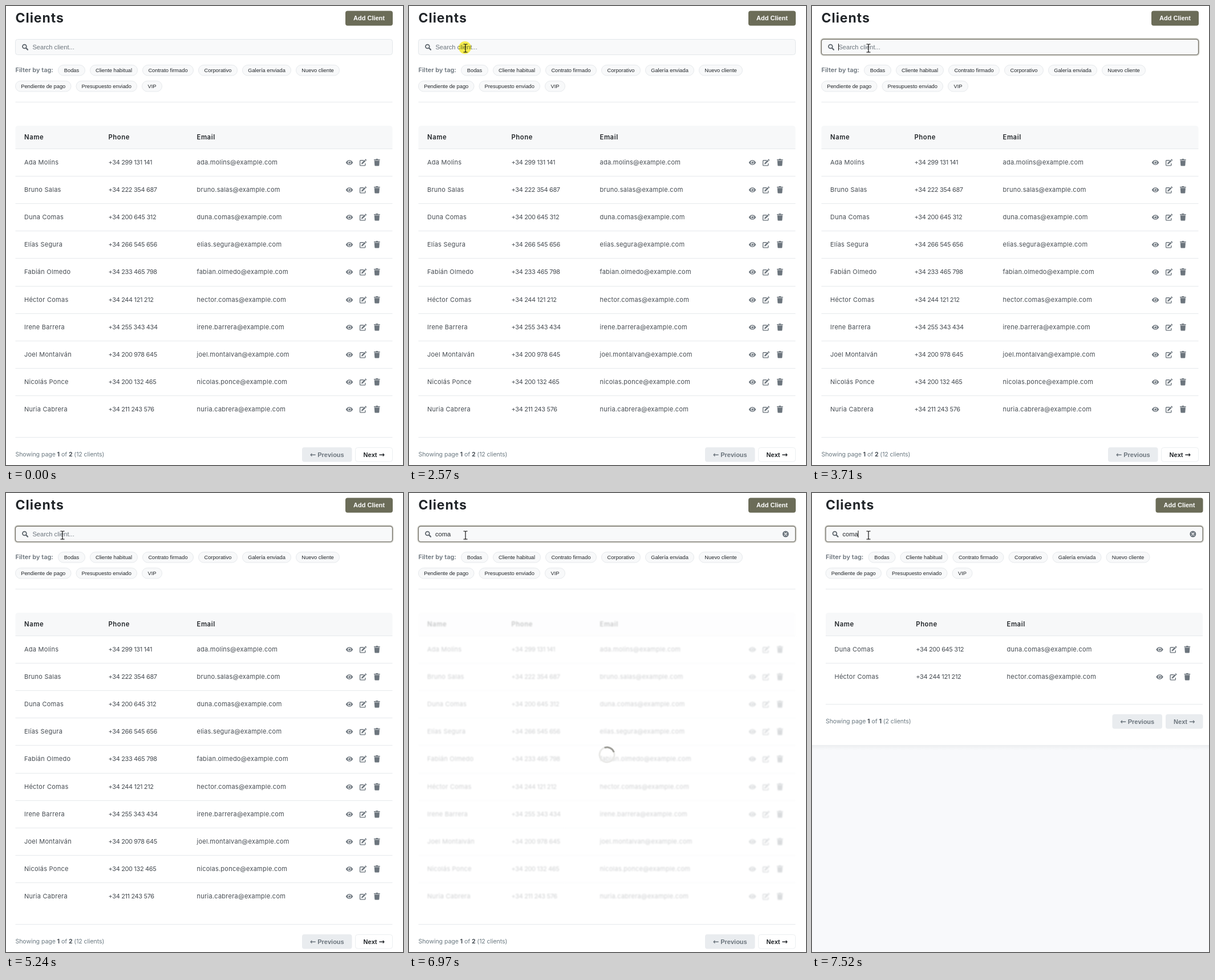
Animation of 696x805 px, one loop 8000 ms. Source, as an HTML page:

```html
<!DOCTYPE html>
<html lang="en">
<head>
<meta charset="utf-8">
<title>Clients</title>
<style>
html, body { margin: 0; width: 100%; height: 100%; overflow: hidden; background: #fff; }
svg { display: block; width: 696px; height: 805px; }
text { font-family: Inter, "Open Sans", sans-serif; font-size: 11px; white-space: pre; }
.ui { font-family: "Liberation Sans", Arial, sans-serif; }
.title { font-size: 23px; font-weight: 700; letter-spacing: .95px; fill: #212529; }
.filter { font-weight: 600; fill: #6c757d; }
.field { font-size: 11.1px; }
.tag { font-size: 9.3px; fill: #212529; text-anchor: middle; }
.btn { font-weight: 700; text-anchor: middle; }
.sign { font-family: "DejaVu Sans", sans-serif; font-size: 12.5px; }
.head { font-size: 11.3px; font-weight: 600; letter-spacing: .55px; fill: #212529; }
.cell { letter-spacing: .25px; fill: #464c52; }
.phone { letter-spacing: -.37px; }
.foot { font-size: 10.6px; letter-spacing: -.1px; fill: #6c7a82; }
.foot tspan { font-weight: 700; fill: #495057; }
</style>
</head>
<body>
<svg id="stage" viewBox="0 0 696 805">
  <defs>
    <g id="eye">
      <path d="M-6.3 0C-4.6-2.9-2.4-4.3 0-4.3S4.6-2.9 6.3 0C4.6 2.9 2.4 4.3 0 4.3S-4.6 2.9-6.3 0Z" fill="#6c757d"/>
      <circle r="3" fill="#fff"/><circle r="2.1" fill="#6c757d"/><circle cx="-.8" cy="-.8" r=".8" fill="#fff"/>
    </g>
    <g id="edit" fill="none" stroke="#6c757d">
      <path d="M1-3.8H-4.4Q-5.4-3.8-5.4-2.8V4.4Q-5.4 5.4-4.4 5.4H2.8Q3.8 5.4 3.8 4.4V1.6" stroke-width="1.4"/>
      <path d="M-1.6 1.6 3.6-3.6" stroke-width="2.7"/>
      <path d="M4.1-4.1 5.3-5.3" stroke-width="3"/>
      <path d="M-3 3-2.6.5-.5 2.6Z" fill="#6c757d" stroke="none"/>
    </g>
    <path id="trash" fill="#6c757d" d="M-5.3-5.3H-2.3L-1.7-6.2H1.7L2.3-5.3H5.3V-3.8H-5.3ZM-4.6-3H4.6L4 5.1Q3.9 6.2 2.9 6.2H-2.9Q-3.9 6.2-4 5.1Z"/>
    <linearGradient id="shade" x2="0" y2="1">
      <stop offset="0" stop-color="#eceef0"/><stop offset="1" stop-color="#f8f9fb"/>
    </linearGradient>
  </defs>
  <g id="page"></g>
</svg>
<script>
const LOOP = 8000, STEP = 200 / 3;
const FOCUS = 2640, LOAD = 6970, RESULT = 7180, DONE = 7320;

const people = [
  ["Ada Molins", "299 131 141"], ["Bruno Salas", "222 354 687"],
  ["Duna Comas", "200 645 312"], ["Elías Segura", "266 545 656"],
  ["Fabián Olmedo", "233 465 798"], ["Héctor Comas", "244 121 212"],
  ["Irene Barrera", "255 343 434"], ["Joel Montalván", "200 978 645"],
  ["Nicolás Ponce", "200 132 465"], ["Nuria Cabrera", "211 243 576"]
];
const tags = [
  ["Bodas", 91.5, 138.5, 0], ["Cliente habitual", 147.5, 230.5, 0],
  ["Contrato firmado", 239.5, 328.5, 0], ["Corporativo", 337.5, 405.5, 0],
  ["Galería enviada", 414.5, 499.5, 0], ["Nuevo cliente", 508.5, 584.5, 0],
  ["Pendiente de pago", 16.5, 114, 28], ["Presupuesto enviado", 123, 229.5, 28],
  ["VIP", 238.5, 273.5, 28]
];
// [time, typed text]
const typing = [[0, ""], [5770, "c"], [6100, "co"], [6300, "com"], [6430, "coma"]];
// times at which the caret switches on and off in turn
const blinks = [FOCUS, 3170, 3710, 4180, 4710, 5240, 5770, LOAD, 7520];

const text = (x, y, cls, str, extra = "") =>
  `<text x="${x}" y="${y}" class="${cls}" ${extra}>${str}</text>`;
const box = (x, y, w, h, r, fill, stroke = "none") =>
  `<rect x="${x}" y="${y}" width="${w}" height="${h}" rx="${r}" fill="${fill}" stroke="${stroke}"/>`;
const line = y => `<path d="M16.5 ${y}H677.5" stroke="#e6e9ec"/>`;
const icon = (name, x, y) => `<use href="#${name}" x="${x}" y="${y}"/>`;
const sign = s => `<tspan class="sign">${s}</tspan>`;
const mailOf = name =>
  name.toLowerCase().normalize("NFD").replace(/[\u0300-\u036f]/g, "").replace(" ", ".") + "@example.com";

function table(rows, phoneX, mailX) {
  let out = `<path d="M16.5 250V215Q16.5 210 21.5 210H672.5Q677.5 210 677.5 215V250Z" fill="#f7f8f9"/>` + line(250.5);
  [["Name", 32], ["Phone", phoneX], ["Email", mailX]].forEach(([s, x]) => out += text(x, 233.7, "head", s));
  rows.forEach(([name, phone], i) => {
    const mid = Math.round(274 + i * 48.12);
    if (i) out += line(mid - 23.5);
    out += text(32, mid + 4, "cell", name) +
      text(phoneX, mid + 4, "cell phone", "+34 " + phone) +
      text(mailX, mid + 4, "cell", mailOf(name)) +
      icon("eye", 602, mid + .5) + icon("edit", 626, mid + .5) + icon("trash", 650.3, mid + .3);
  });
  return out;
}

function footer(y, pages, count, nextOn) {
  return line(y + .5) +
    text(16.5, y + 33.5, "foot", `Showing page <tspan>1</tspan> of <tspan>${pages}</tspan> (${count} clients)`) +
    box(519, y + 18, 87.5, 25.5, 4, "#e9ecef") +
    text(562.7, y + 34.7, "ui btn", sign("←") + " Previous", 'fill="#6c757d"') +
    (nextOn ? box(612.5, y + 18.5, 65, 24.5, 4, "#fff", "#eceff1") : box(612.5, y + 18, 65.5, 25.5, 4, "#e9ecef")) +
    text(645.3, y + 34.7, "ui btn", "Next " + sign("→"), `fill="${nextOn ? "#212529" : "#6c757d"}"`);
}

const header =
  text(16.5, 29, "title", "Clients") +
  box(595, 8.5, 83, 26, 4, "#6b6c58") + text(636.5, 25, "ui btn", "Add Client", 'fill="#fff"') +
  `<rect id="glow" x="15.5" y="57.2" width="663" height="29.4" rx="5" fill="none" stroke="#6b6c58" stroke-opacity=".28" stroke-width="2.2"/>` +
  box(16.5, 58.5, 661, 27, 4, "#f8f9fa", "#e3e7ea") +
  `<rect id="ring" x="16.5" y="58.3" width="661" height="27.2" rx="4" fill="none" stroke="#6f6c62" stroke-width="1.2"/>
   <g fill="none" stroke="#5f676e" stroke-linecap="round"><circle cx="32.4" cy="71" r="3.4" stroke-width="1.8"/><path d="M35.2 73.8 38 76.6" stroke-width="2.2"/></g>` +
  text(46.4, 76, "ui field", "Search client...", 'id="hint" fill="#6c757d"') +
  text(46, 76, "ui field", "", 'id="typed" fill="#212529"') +
  `<path id="caret" d="M.5 66V78" stroke="#111"/>
   <g id="clear"><circle cx="660.3" cy="72" r="5.5" fill="#6c757d"/><path d="M658.3 70l4 4m0-4-4 4" stroke="#fff" stroke-width="1.4" stroke-linecap="round"/></g>` +
  text(16.5, 115.5, "filter", "Filter by tag:") +
  tags.map(([s, a, b, dy]) => box(a, 103.5 + dy, b - a, 18.5, 9.25, "#f8f9fa", "#e6e9ec") +
    text((a + b) / 2, 116.3 + dy, "ui tag", s)).join("") +
  line(168.5);

const $ = id => document.getElementById(id);
$("page").innerHTML =
  `<g id="ground">${box(0, 0, 696, 805, 0, "#f8f9fb")}${box(0, 0, 696, 442, 0, "#fff")}
     <rect y="442" width="696" height="9" fill="url(#shade)"/></g>
   <g id="body">${header}
     <g id="all"><g id="allRows">${table(people, 179.5, 334.5)}</g>${footer(756, 2, 12, true)}</g>
     <g id="found"><g id="foundRows">${table(people.filter(p => p[0].endsWith("Comas")), 174.8, 334)}</g>${footer(370, 1, 2, false)}</g>
   </g>
   <g id="spinner" fill="none" stroke-width="3"><circle r="13" stroke="#e9e9e7"/><path d="M-9.2-9.2A13 13 0 0 1 9.2-9.2" stroke="#9b9b95"/></g>
   <circle id="click" cx="98" cy="73" r="11" fill="#fbf250" style="mix-blend-mode:multiply"/>
   <path id="arrow" d="M0 0V15.5L3.7 12.2 6 17.5 8.4 16.4 6.1 11.4H11Z" fill="#fff" stroke="#000"/>
   <path id="beam" d="M-3.5-7H-1Q0-7 0-6 0-7 1-7H3.5M0-6V6M-3.5 7H-1Q0 7 0 6 0 7 1 7H3.5" fill="none" stroke="#000" stroke-width="1.1"/>`;

const show = (id, on) => $(id).style.display = on ? "" : "none";
const clamp = v => Math.max(0, Math.min(1, v));
const bezier = (a, b, c, d, u) => {
  const v = 1 - u;
  return a * v * v * v + 3 * b * v * v * u + 3 * c * v * u * u + d * u * u * u;
};

function pointer(t) {
  const u = clamp(Math.floor((t - 430) / STEP + .01) / 9);
  const s = u * u * (3 - 2 * u);
  const x = bezier(617, 330, -70, 99, s), y = bezier(765, 470, 110, 74, s);
  const inField = y < 86;
  show("arrow", t >= 430 && !inField);
  show("beam", t >= 430 && inField);
  $(inField ? "beam" : "arrow").setAttribute("transform", `translate(${x.toFixed(1)} ${y.toFixed(1)})`);
}

function soften(id, amount) {
  const el = $(id);
  el.style.filter = amount > 0 ? `blur(${amount}px)` : "none";
  el.style.opacity = 1 - .74 * amount;
}

function draw(t) {
  pointer(t);

  const fade = Math.floor((t - 2570) / STEP + .01);
  show("click", t >= 2570 && t < 2838);
  $("click").style.opacity = 1 - clamp(fade / 4);
  $("ring").style.opacity = $("glow").style.opacity = clamp(fade / 4);

  const word = typing.filter(k => t >= k[0]).pop()[1];
  if ($("typed").textContent !== word) $("typed").textContent = word;
  show("hint", !word);
  show("clear", word);
  const end = word ? $("typed").getComputedTextLength() : 0;
  $("caret").setAttribute("transform", `translate(${Math.round(46 + end)} 0)`);
  show("caret", blinks.filter(b => t >= b).length % 2);

  const result = t >= RESULT;
  show("all", !result);
  show("found", result);
  show("ground", result);
  $("body").setAttribute("transform", `translate(${result ? 7.5 : 0} 0)`);
  soften("allRows", t >= LOAD ? 1 : 0);
  soften("foundRows", clamp((DONE - t) / (DONE - RESULT)));
  show("spinner", t >= LOAD && !result);
  $("spinner").setAttribute("transform", `translate(347 459) rotate(${25 + (t - LOAD) * .36})`);
}

const start = performance.now();
function tick() {
  draw((performance.now() - start) % LOOP);
  requestAnimationFrame(tick);
}
tick();
</script>
</body>
</html>
```
